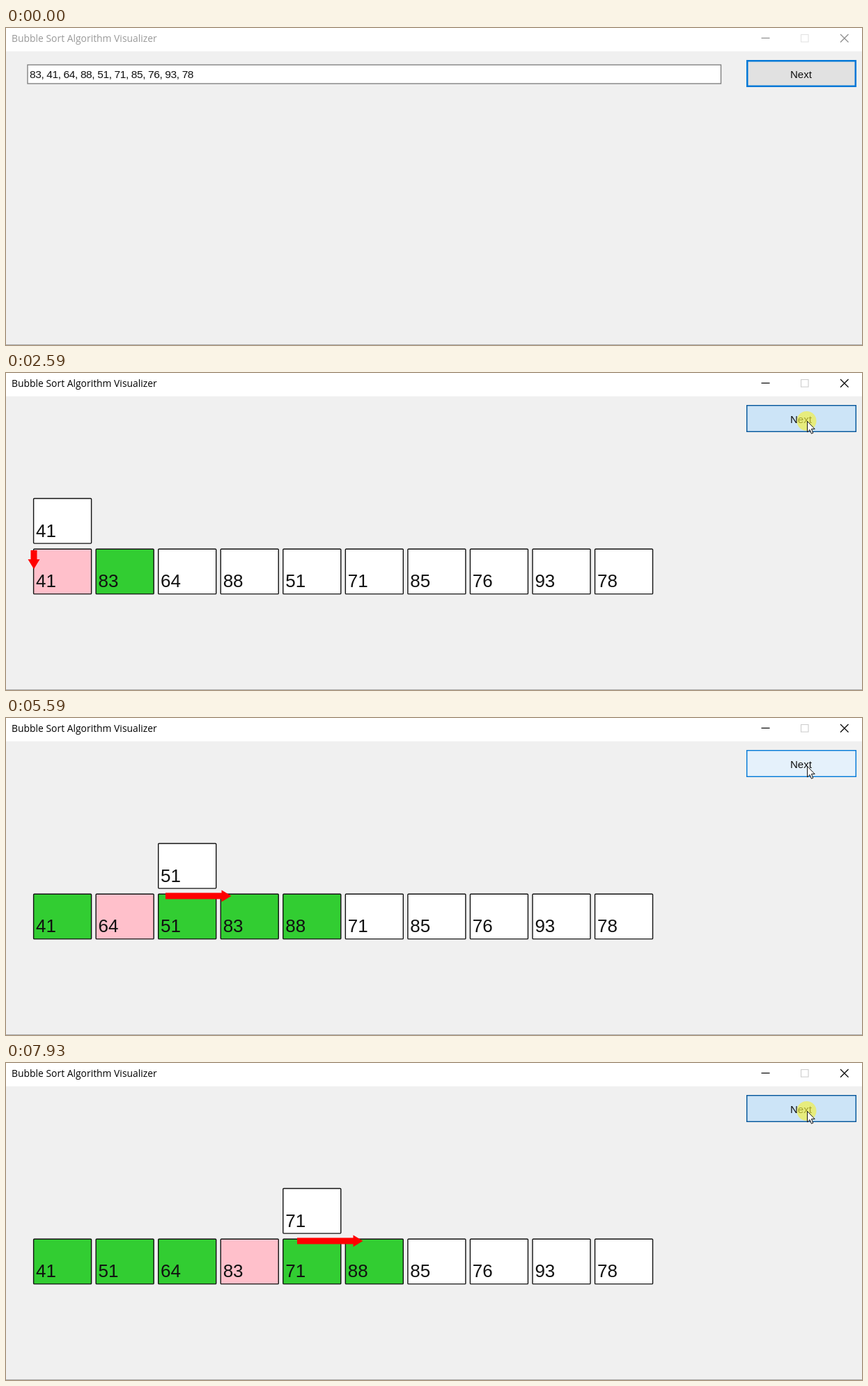
Animation, 1229 px wide and 456 px high, one loop 8 s. Source, as an HTML page:

```html
<!DOCTYPE html>
<html lang="en">
<head>
<meta charset="utf-8">
<title>Bubble Sort Algorithm Visualizer</title>
<style>
  html, body { margin: 0; width: 100%; height: 100%; overflow: hidden; background: #f0f0f0; }
  svg { display: block; width: 1229px; height: 456px; }
  text { font-family: "Liberation Sans", Arial, sans-serif; fill: #111; }
  .title { font: 13.9px "Open Sans", "Noto Sans", sans-serif; }
  .input { font-size: 15.5px; letter-spacing: -.39px; }
  .label { font-size: 15px; }
  .value { font-size: 26px; }
</style>
</head>
<body>
<svg id="stage" viewBox="0 0 1229 456" xmlns="http://www.w3.org/2000/svg"></svg>
<script>
const LOOP = 8000;
const VALUES = [83, 41, 64, 88, 51, 71, 85, 76, 93, 78];
const GREEN = '#32cd32', PINK = '#ffc0cb', WHITE = '#fff';

// Each click is [press, release]; a release advances the sort by one step.
const CLICKS = [
  [900, 1050], [1580, 1660], [2130, 2260], [2590, 2720], [2980, 3180],
  [3460, 3530], [3930, 4000], [4260, 4390], [4660, 4730], [5000, 5060],
  [5460, 5590], [5920, 6050], [6450, 6580], [6990, 7060], [7390, 7590],
  [7860, LOOP + 1]
];
const HOVER_AT = 760, ACTIVE_AT = 900, BUSY = [1120, 1800];

function sortSteps() {
  const list = [...VALUES], steps = [];
  const record = (arrow, last, at, pink, lifted) =>
    steps.push({ arrow, last, at, pink, lifted, list: [...list] });
  for (let i = 1; i < list.length; i++) {
    let j = i;
    record('up', i, i, -1, PINK);
    while (j > 0 && list[j - 1] > list[j]) {
      [list[j - 1], list[j]] = [list[j], list[j - 1]];
      j--;
      record('right', i, j, j - 1, WHITE);
    }
    record('down', i, j, j, WHITE);
  }
  return steps;
}
const STEPS = sortSteps();

const rect = (x, y, w, h, fill, stroke = 'none', width = 0, rx = 0) =>
  `<rect x="${x}" y="${y}" width="${w}" height="${h}" rx="${rx}" fill="${fill}" stroke="${stroke}" stroke-width="${width}"/>`;
const path = (d, stroke, width) =>
  `<path d="${d}" fill="none" stroke="${stroke}" stroke-width="${width}"/>`;
const text = (x, y, cls, value, fill = '#111') =>
  `<text x="${x}" y="${y}" class="${cls}" style="fill:${fill}">${value}</text>`;

function cell(i, y, value, fill) {
  const x = 39.6 + 89.55 * i;
  return rect(x, y, 83, 64.6, fill, '#111', 1.4, 1) + text(x + 3.4, y + 55, 'value', value);
}

function arrow(kind, i, fill) {
  const x = 40 + 94.5 * i;
  const [y, angle, length] = {
    up: [282.5, -90, 27], down: [255, 90, 27], right: [256, 0, 94.5]
  }[kind];
  const neck = length - 14;
  return `<path transform="translate(${x} ${y}) rotate(${angle})" fill="${fill}"
    d="M0-4.5H${neck}V-8.5L${length} 0L${neck} 8.5V4.5H0Z"/>`;
}

function frame(active) {
  const ink = active ? '#000' : '#8c8c8c';
  return rect(0, 0, 1229, 456, '#f0f0f0') + rect(0, 0, 1229, 33.5, WHITE) +
    rect(0, 455, 1229, 1, '#adadad') +
    text(8, 19.5, 'title', 'Bubble Sort Algorithm Visualizer', active ? '#000' : '#999') +
    path('M1084.5 14.5h12', ink, 1.2) +
    path('M1141.5 9.5h10.5v10.5h-10.5z', active ? '#ccc' : '#e2e2e2', 1.1) +
    path('M1198 9l11.5 11.5m0-11.5l-11.5 11.5', ink, 1.2);
}

function button(state) {
  const [fill, stroke, width] = {
    idle: ['#e1e1e1', '#0078d7', 2.5],
    hover: ['#e5f1fb', '#0078d7', 1.4],
    pressed: ['#cce4f7', '#005499', 1.4]
  }[state];
  const inset = width / 2;
  return rect(1063 + inset, 46 + inset, 158 - width, 39 - width, fill, stroke, width) +
    text(1126, 72, 'label', 'Next');
}

function board(step, red) {
  const cells = step.list.map((value, i) =>
    cell(i, 253.3, value, i === step.pink ? PINK : i <= step.last ? GREEN : WHITE));
  return cells.join('') + cell(step.at, 180.5, step.list[step.at], step.lifted) +
    arrow(step.arrow, step.at, red);
}

function pointer(t) {
  if (t < 70) return '';
  const p = Math.min(1, (Math.floor((t - 70) / 69) + 1) / 12);
  const ease = p * p * (3 - 2 * p);
  const x = 1136 + 14 * ease, y = 455 - 386 * ease;
  return `<path transform="translate(${x} ${y})" fill="#fff" stroke="#111" stroke-width="1"
    d="M.5.5V16L4 12.6L6.4 18.2L8.8 17.2L6.4 11.6H11.2Z"/>`;
}

function spinner(t) {
  if (t < BUSY[0] || t >= BUSY[1]) return '';
  const turn = Math.floor((t - BUSY[0]) / 76) * 50;
  return `<g transform="rotate(${turn} 1163.5 69.5)" fill="none" stroke-width="3.6">
    <circle cx="1163.5" cy="69.5" r="5.8" stroke="#3f97e6"/>
    <path d="M1157.7 69.5a5.8 5.8 0 0 1 5.8-5.8" stroke="#86c8f5"/></g>`;
}

function draw(t) {
  const pressed = CLICKS.some(([down, up]) => t >= down && t < up);
  const done = CLICKS.filter(([, up]) => t >= up).length;
  const state = pressed ? 'pressed' : t >= HOVER_AT ? 'hover' : 'idle';
  const content = done
    ? board(STEPS[done - 1], done === 1 ? '#d51414' : '#f00')
    : rect(31, 53, 995.5, 27, WHITE, '#7a7a7a', 1.3) + text(34, 71.5, 'input', VALUES.join(', '));
  const glow = pressed ? '<circle cx="1149.5" cy="69" r="14" fill="#f4f03c" fill-opacity=".65"/>' : '';
  return frame(t >= ACTIVE_AT) + content + button(state) + glow + spinner(t) + pointer(t);
}

const stage = document.getElementById('stage');
const start = performance.now();
let shown = '';
function tick() {
  const markup = draw((performance.now() - start) % LOOP);
  if (markup !== shown) stage.innerHTML = shown = markup;
  requestAnimationFrame(tick);
}
tick();
</script>
</body>
</html>
```
